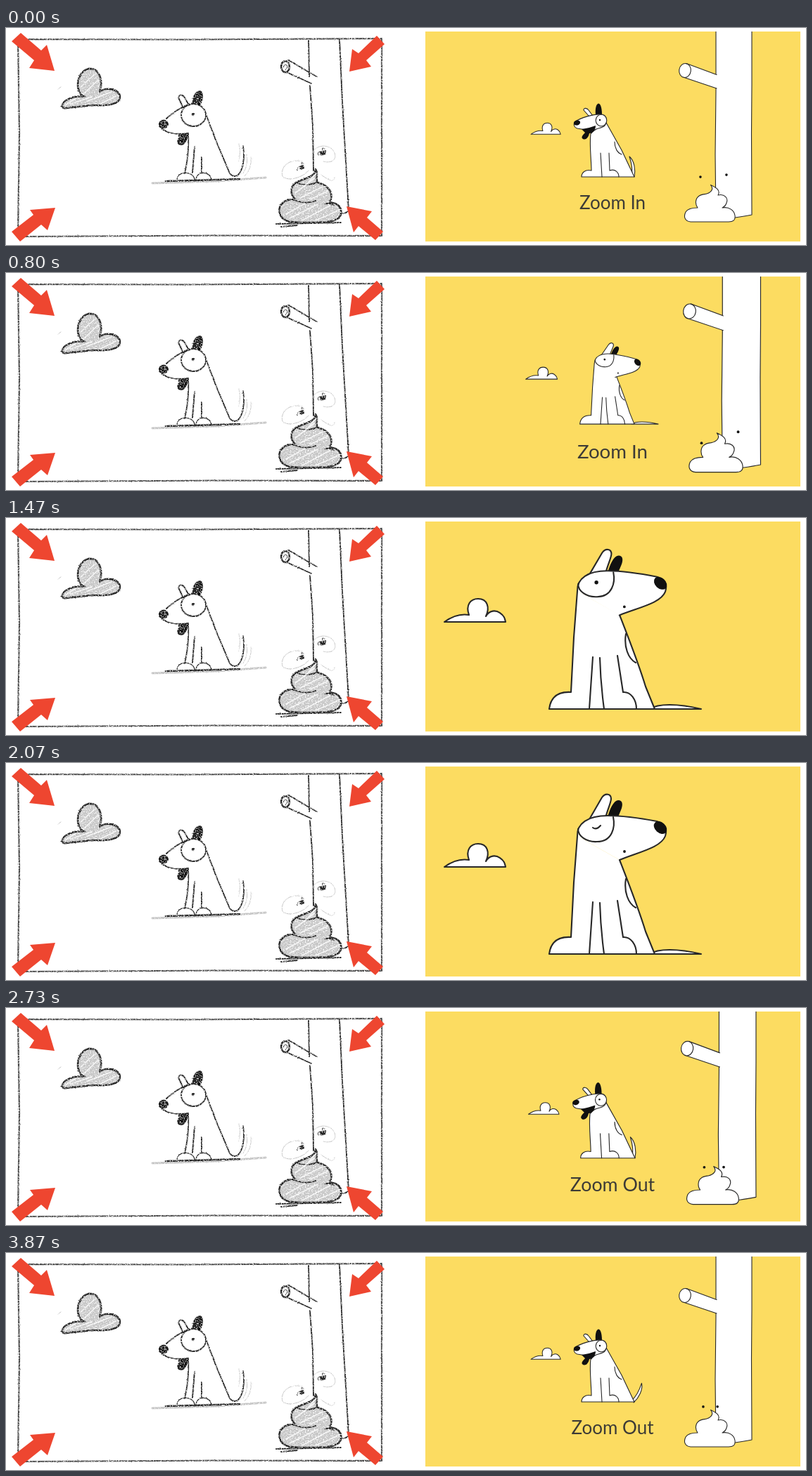
An HTML page that plays this animation: 1137x309 px, repeating every 3940 ms.

```html
<!DOCTYPE html>
<html lang="en">
<head>
<meta charset="utf-8">
<title>Zoom in, zoom out</title>
<style>
  html, body { margin: 0; width: 100%; height: 100%; overflow: hidden; background: #fff; }
  svg { display: block; width: 1137px; height: 309px; }
  path, ellipse { stroke-linecap: round; stroke-linejoin: round; }
  .ink { fill: none; stroke: #222; stroke-width: 1.9; }
  .thick { stroke-width: 2.6; }
  .shade { fill: #c6c6c6; }
  .faint { fill: none; stroke: #c4c4c4; stroke-width: 1; }
  .hatch { fill: none; stroke: #f4f4f4; stroke-width: 1.6; }
  .solid { fill: #111; stroke: none; }
  .arrow { fill: #ee4630; }
  .line { fill: #fff; stroke: #282828; stroke-width: 1.1; }
  .close .line { stroke-width: 2.1; }
  .close .open, .open { fill: none; }
  text { font: 26px Lato, "Open Sans", sans-serif; fill: #3d3b36; text-anchor: middle; }
</style>
</head>
<body>
<svg viewBox="0 0 1137 309">
  <defs>
    <filter id="pencil" x="0" y="0" width="560" height="309" filterUnits="userSpaceOnUse" color-interpolation-filters="sRGB">
      <feTurbulence type="fractalNoise" baseFrequency=".55" numOctaves="2" seed="4" result="noise"/>
      <feDisplacementMap in="SourceGraphic" in2="noise" scale="2" xChannelSelector="R" yChannelSelector="G" result="rough"/>
      <feColorMatrix in="noise" values="0 0 0 0 0  0 0 0 0 0  0 0 0 0 0  0 0 3 0 -.6" result="grain"/>
      <feComposite in="rough" in2="grain" operator="in"/>
    </filter>
    <clipPath id="frame"><rect x="596" y="5" width="533" height="299"/></clipPath>
  </defs>

  <!-- Storyboard sketch -->
  <g filter="url(#pencil)">
    <path class="ink" style="stroke:#444;stroke-width:2.2" d="M17 16L250 16.500L534 15L534 296L300 295.500L17 297L19 150Z"/>

    <path class="ink thick shade" d="M112 98C97 93 99 63 117 58C135 56 138 78 133 91C143 83 161 87 162 98C162 109 145 111 122 110L86 114C79 115 77 110 84 104C92 98 103 96 112 98"/>
    <path class="hatch" d="M106 84L126 66M110 94L131 74M116 104L150 91M92 108L122 98M134 108L156 97M84 110L98 101"/>

    <path class="faint" style="stroke-width:3" d="M208 221L300 218L369 213"/>
    <path class="ink" d="M228 129Q246 112 266 107M218 140C226 150 241 152 258 150M259 152C260 172 258 190 254 207M268 169L265 206M278 184L278 205M285 125L299 162L318 207Q324 214 330 209C336 203 340 187 337 168"/>
    <path class="ink" style="stroke-width:1.300" d="M243 216C243 203 267 203 268 216M270 216C271 202 291 204 292 216"/>
    <ellipse class="ink" cx="266.500" cy="124" rx="17.500" ry="16"/>
    <path class="ink" d="M252 114L245 99C247 93 253 95 256 103L260 110"/>
    <path class="solid" d="M265 108C264 95 272 87 278 90C282 96 279 105 276 111ZM244 153C249 150 253 151 260 149C258 158 256 166 249 167C242 166 242 160 246 156Z"/>
    <ellipse class="solid" cx="224" cy="137" rx="7" ry="6.500"/>
    <circle class="solid" cx="266" cy="123" r="2.200"/>
    <path class="ink thick" d="M227 218L285 216.500L332 215"/>
    <path class="faint" d="M331 165Q334 176 331 190M342 180Q345 195 337 207M348 184Q350 200 339 211"/>

    <path class="ink" d="M430 17L431 69M432 82L436 140L437 203M474 17L478 105L487 260Q482 265 477 264M402 46L441 69M399 63L434 79"/>
    <ellipse class="ink thick" cx="397" cy="55" rx="6" ry="8"/>
    <path class="ink" style="stroke-width:1" d="M394 56Q397 48 400 55L397 60"/>

    <path class="ink thick shade" d="M440 201C440 212 424 214 412 220C402 228 405 238 411 244C393 243 386 254 389 264C393 279 413 277 432 277C451 277 474 277 476 265C478 254 470 249 460 248C466 237 461 225 443 220C439 215 445 208 440 201Z"/>
    <path class="ink" d="M412 220Q427 227 443 219M408 244Q425 252 440 246M453 251Q459 248 466 252M384 279L430 278L476 277M391 283L414 281"/>
    <path class="hatch" d="M411 235L438 214M418 242L450 226M432 244L458 232M398 265L425 250M403 271L443 251M421 274L460 253M440 274L472 260M430 219L440 208"/>
    <path class="faint" d="M421 190C402 185 389 199 393 211C401 220 423 212 430 203M435 181C436 169 452 164 463 172C474 184 465 194 451 190M448 209Q466 223 467 213"/>
    <path class="ink" style="stroke-width:1" d="M418 197Q412 199 414 203M421 196Q418 189 423 193M447 176Q441 177 444 181M450 174Q448 169 453 172"/>
    <path class="solid" d="M417 197L423 195L424 200L418 202ZM446 176L455 174L454 180L447 182Z"/>
    <path class="faint" d="M74 87L78 84"/>
  </g>
  <path class="arrow" d="M21 7L50 32L58 24L69 61L33 57L40 46L8 19ZM527 11L538 23L512 46L519 55L488 62L492 30L501 36ZM8 290L39 266L34 259L70 256L59 288L50 280L20 304ZM484 254L520 261L513 270L536 290L525 302L501 282L494 291Z"/>

  <!-- Animated shot -->
  <g clip-path="url(#frame)">
    <rect x="596" y="5" width="533" height="299" fill="#fcdc61"/>
    <g id="camera">
      <path class="line" d="M1009 -5L1009 90L1008 180L1009 270L1036 270Q1050 268 1060 266L1059.500 150L1060 80L1060 -5Z"/>
      <path class="line" d="M1010 66.500L967 50.500L964 70.500L1010 86"/>
      <path d="M1009 67.200L1012 68L1012 85L1009 85Z" fill="#fff"/>
      <ellipse class="line" cx="965" cy="60.500" rx="8.300" ry="10" transform="rotate(8 965 60.500)"/>
      <path class="line" d="M973 276C964 275 963 268 966 262C969 257 976 256 983 256C979 251 980 243 984 240C987 237 990 237 994 236.500C1001 235 1007 230 1001.500 223.500C1009 227 1016 231 1012 238C1021 236 1027 242 1024 249C1023 253 1020 255 1018 256C1028 254 1035 260 1036 267C1037 274 1033 276 1027 276Z"/>
      <circle class="solid fly" r="1.800"/>
      <circle class="solid fly" r="1.800"/>
      <text id="label" x="862" y="257.500"></text>

      <g class="close" transform="translate(862 154.500) scale(.4854) translate(-862 -154.500)">
        <path class="line" d="M623 148C634 140 646 136 658 138C653 124 660 115 671 115C684 115 688 127 682 140C687 131 696 131 702 135C708 139 709 143 710 148Z"/>
      </g>

      <g id="pantingDog">
        <path id="tail" class="line" d="M889 211C891 202 889 192 886 183C893 189 895 202 893 212"/>
        <path class="line" d="M831 150C829 168 832 188 832 203C823 201 818 206 818 212L893 212L875 174L852 133Z"/>
        <path class="line open" d="M865 162C865 171 869 178 875 180M845 178L847 212M857 178L858 203C866 200 871 206 871 212"/>
        <g id="pantingHead">
          <path class="line" d="M829 126L821 117C821 113 826 114 828 117L834 125"/>
          <path class="solid" d="M838 124C837 114 839 108 842 107.500C846 108 847 117 847 124Z"/>
          <path class="line" d="M808 134C816 128 835 122 847 123C854 124 855 134 851 139C846 144 835 142 832 150L830 146L812 143C808 142 806 138 808 134Z"/>
          <ellipse class="line" cx="846" cy="131.500" rx="7.800" ry="8.200"/>
          <circle class="solid" cx="844" cy="131" r="1.200"/>
          <ellipse class="solid" cx="811.500" cy="135" rx="4.700" ry="3.500" transform="rotate(-15 811.500 135)"/>
          <path class="solid" d="M818 144C826 143 832 141 838 139C838 146 833 150 829 150C828 156 824 160 820 158C816 156 821 151 823 149Z"/>
        </g>
      </g>

      <g id="turnedDog" class="close" transform="translate(862 154.500) scale(.4854) translate(-862 -154.500)">
        <path class="line" d="M915 272C926 264 955 264 988 272Z"/>
        <path class="line" d="M812 104L807 170L803 248C785 247 774 255 772 272L922 272L909 240C899 207 886 174 872 138"/>
        <path class="line open" d="M881 165C878 183 884 200 895 206M834 198L829 272M844 199Q845 235 850 272M869 196L877 248C888 247 896 259 896 272"/>
        <g id="turnedHead">
          <path class="line" d="M828 82L847 49C852 42 860 44 860 51C860 56 855 66 852 78"/>
          <path class="solid" d="M855 77C858 66 863 54 870 53C877 53 877 60 874 67L869 79Z"/>
          <path class="line" d="M812 104C811 86 827 75 855 75C878 75 904 79 925 83C937 86 940 94 937 104C931 120 902 126 872 138"/>
          <path class="line open" d="M863 77C866 91 862 112 840 112C825 113 813 104 813 94"/>
          <ellipse class="solid" cx="930" cy="92" rx="10.500" ry="7.500" transform="rotate(42 930 92)"/>
          <circle class="solid" cx="879" cy="126" r="1.900"/>
          <circle id="eye" class="solid" cx="839" cy="91.500" r="2.700"/>
          <path id="lid" class="line open" d="M834 92Q839 96 845 89"/>
        </g>
      </g>
    </g>
  </g>
</svg>
<script>
  const LOOP = 3940, CX = 862, CY = 154.5, ZOOM = 1.06, ZOOM_TIME = 930;
  const byId = id => document.getElementById(id);
  const [camera, label, panting, turned, tail, pantingHead, turnedHead, eye, lid] =
    ["camera", "label", "pantingDog", "turnedDog", "tail", "pantingHead", "turnedHead", "eye", "lid"].map(byId);
  const flies = document.querySelectorAll(".fly");

  // Each stop is [time, x, y].
  const routes = [
    [[0, 987, 212], [200, 976, 228], [400, 990, 246], [600, 1000, 228], [800, 981, 237],
     [1070, 982, 239], [1350, 1000, 250], [2530, 1002, 209], [2800, 984, 230],
     [3070, 1006, 252], [3330, 982, 236], [3600, 1000, 216], [3870, 991, 219], [LOOP, 987, 212]],
    [[0, 1024, 209], [270, 1008, 232], [530, 1022, 246], [800, 1030, 222],
     [2530, 1002, 252], [2800, 1020, 215], [3070, 1021, 232], [3330, 1004, 240],
     [3600, 1022, 216], [3870, 1011, 219], [LOOP, 1024, 209]]
  ];

  const ease = u => u < .5 ? 8 * u ** 4 : 1 - 8 * (1 - u) ** 4;
  const progress = (t, start, length) => ease(Math.min(1, Math.max(0, (t - start) / length)));
  const show = (el, on) => el.setAttribute("visibility", on ? "visible" : "hidden");

  function along(route, t) {
    const i = route.findIndex(stop => stop[0] > t);
    const [t0, x0, y0] = route[i - 1], [t1, x1, y1] = route[i];
    const u = (t - t0) / (t1 - t0);
    return [x0 + (x1 - x0) * u, y0 + (y1 - y0) * u];
  }

  function draw(t) {
    const scale = 1 + ZOOM * (progress(t, 528, ZOOM_TIME) - progress(t, 2028, ZOOM_TIME));
    camera.setAttribute("transform",
      `translate(${CX} ${CY}) scale(${scale}) translate(${-CX} ${-CY})`);
    label.textContent = t < 1500 ? "Zoom In" : "Zoom Out";

    const isTurned = t >= 600 && t < 2730;
    const blinking = isTurned && t >= 2030 && t < 2190;
    show(panting, !isTurned);
    show(turned, isTurned);
    eye.style.display = blinking ? "none" : "";
    lid.style.display = blinking ? "" : "none";

    const phase = t < 600 ? t : t - 3070;
    const wag = (1 - Math.cos(phase * 2 * Math.PI / 320)) / 2;
    tail.setAttribute("transform", `rotate(${wag * 36} 891 211)`);
    pantingHead.setAttribute("transform", `translate(0 ${wag})`);

    // The dog lifts its nose to sniff once the camera is close.
    const lowered = 1 - progress(t, 1200, 400);
    turnedHead.setAttribute("transform", `rotate(${lowered * 4.8} 815 108)`);

    flies.forEach((fly, i) => {
      const [x, y] = along(routes[i], t);
      fly.setAttribute("cx", x);
      fly.setAttribute("cy", y);
    });
  }

  const begin = performance.now();
  function tick() {
    draw((performance.now() - begin) % LOOP);
    requestAnimationFrame(tick);
  }
  tick();
</script>
</body>
</html>
```
